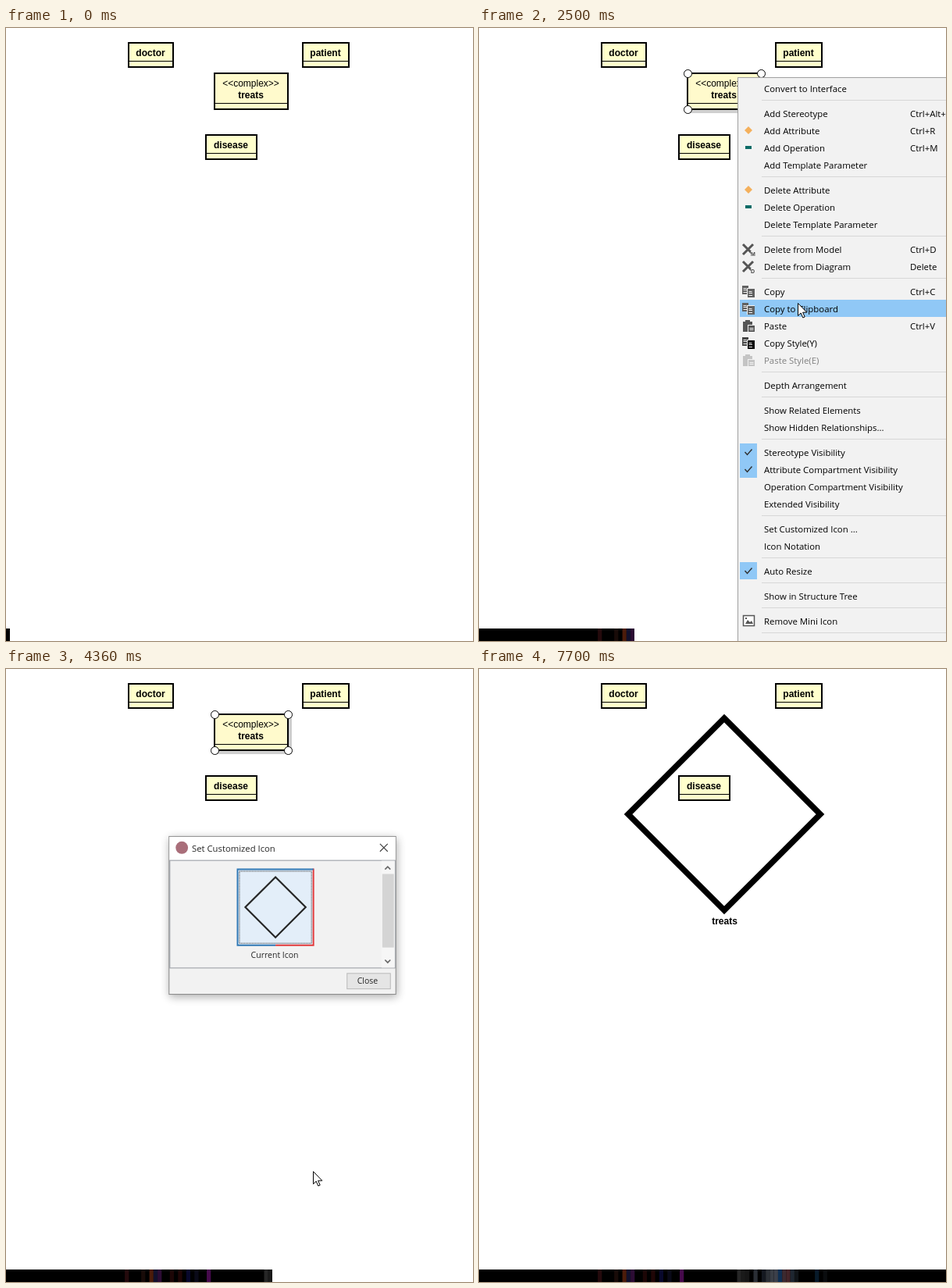
Write an HTML page that moves like this. It is 598 px wide and 785 px high and loops after 7.77 s.

```html
<!DOCTYPE html>
<html lang="en">
<head>
<meta charset="utf-8">
<title>Customized icon</title>
<style>
  html, body { margin: 0; width: 100%; height: 100%; overflow: hidden; background: #fff; }
  svg { display: block; }
  text { white-space: pre; }
  .uml { font: 12px "Liberation Sans", Arial, sans-serif; text-anchor: middle; }
  .bold { font-weight: bold; }
  .ui { font: 11.4px "Open Sans", "Noto Sans", sans-serif; }
  .small { font: 10.6px "Open Sans", "Noto Sans", sans-serif; text-anchor: middle; }
  #dialog { filter: drop-shadow(1px 3px 6px rgba(0, 0, 0, .38)); }
</style>
</head>
<body>
<svg id="stage" width="598" height="785" viewBox="0 0 598 785"></svg>
<script>
const LOOP = 7770, FRAMES = 114, SLOT = 598 / FRAMES;
const BLUE = '#90c8f6';

const rect = (x, y, w, h, fill, extra = '') =>
  `<rect x="${x}" y="${y}" width="${w}" height="${h}" fill="${fill}" ${extra}/>`;
const path = (d, stroke, width = 1, fill = 'none') =>
  `<path d="${d}" fill="${fill}" stroke="${stroke}" stroke-width="${width}"/>`;
const label = (x, y, text, cls, fill = '#000') =>
  `<text x="${x}" y="${y}" class="${cls}" fill="${fill}">${text}</text>`;
const group = (id, body) => `<g id="${id}">${body}</g>`;
const diamond = (x, y, r, stroke, width, fill) =>
  path(`M${x} ${y - r}l${r} ${r}l${-r} ${r}l${-r} ${-r}z`, stroke, width, fill);
const handles = (x1, y1, x2, y2) => [[x1, y1], [x2, y1], [x1, y2], [x2, y2]]
  .map(([x, y]) => `<circle cx="${x}" cy="${y}" r="5" fill="#fff" stroke="#000"/>`).join('');

function umlClass(name, x, y, w, h, stereotype) {
  const mid = x + w / 2, split = y + h - 9;
  return rect(x + 1, y + 1, w - 2, h - 2, '#ffffcc', 'stroke="#000" stroke-width="2"') +
    (stereotype ? rect(x + 2, y + 2, w - 4, h - 11, '#fffacc') +
      label(mid - .5, y + 18, stereotype, 'uml') : '') +
    rect(x + 2, split, w - 4, 1, '#000') +
    label(mid - .5, split - 6, name, 'uml bold');
}

// Menu icons, each drawn around the centre of its row.
const sheet = (x, y, c) => rect(x, y, 8, 11, c) +
  path(`M${x + 1.5} ${y + 3.5}h4M${x + 1.5} ${y + 5.5}h5M${x + 1.5} ${y + 8.5}h5`, '#f2f2f2');
const copyIcon = (back, front) => sheet(-8, -8, back) +
  rect(-2, -5, 10, 12, '#f2f2f2') + sheet(-1, -4, front) + rect(5, -4, 3, 11, front);
const pasteIcon = c => rect(-7, -6, 12, 13, c) + rect(-4, -8, 6, 3, c) +
  rect(-1, -2, 9, 10, '#f2f2f2') + rect(0, -1, 8, 8, c) +
  path('M1.5 2.5h5M1.5 4.5h5', '#f2f2f2');
const crossIcon = letter => path('M-7 -7L6 6M6 -7L-7 6', '#555', 3) +
  rect(3, 2, 6, 7, '#f2f2f2') +
  `<text x="3" y="8" font-size="7" font-weight="bold" font-family="Liberation Sans, sans-serif" fill="#444">${letter}</text>`;
const ICONS = {
  attr: diamond(0, -1, 5, 'none', 0, '#f4b05c'),
  oper: rect(-4, -3, 8, 4, '#0b6b66'),
  delM: crossIcon('M'),
  delD: crossIcon('D'),
  copy: copyIcon('#606060', '#606060'),
  style: copyIcon('#444', '#000'),
  paste: pasteIcon('#555'),
  pasteOff: pasteIcon('#c4c4c4'),
  check: path('M-4.5 -1l3 3.5l6 -7', '#303030', 1.4),
  image: rect(-6.5, -7.5, 14, 13, '#fff', 'stroke="#555" stroke-width="1.5"') +
    path('M-4 3l3 -5l3 3l2 -2l2 4z', 'none', 0, '#555') + rect(-4, -5, 2, 2, '#555')
};
const MENU = `Convert to Interface
-
Add Stereotype||Ctrl+Alt+S
Add Attribute|attr|Ctrl+R
Add Operation|oper|Ctrl+M
Add Template Parameter
-
Delete Attribute|attr
Delete Operation|oper
Delete Template Parameter
-
Delete from Model|delM|Ctrl+D
Delete from Diagram|delD|Delete
-
Copy|copy|Ctrl+C
Copy to Clipboard|copy
Paste|paste|Ctrl+V
Copy Style(Y)|style
Paste Style(E)|pasteOff
-
Depth Arrangement
-
Show Related Elements
Show Hidden Relationships...
-
Stereotype Visibility|check
Attribute Compartment Visibility|check
Operation Compartment Visibility
Extended Visibility
-
Set Customized Icon ...
Icon Notation
-
Auto Resize|check
-
Show in Structure Tree
-
Remove Mini Icon|image
-`.split('\n');

const rows = [];
function buildMenu() {
  let y = 78, lines = '', items = '', checks = '';
  for (const entry of MENU) {
    if (entry === '-') {
      lines += rect(362, y - 8, 236, 1, '#d7d7d7');
      y += 10;
      continue;
    }
    const [name, icon, keys] = entry.split('|');
    const ink = icon === 'pasteOff' ? '#808080' : '#000';
    rows.push({ y, checked: icon === 'check' });
    if (icon === 'check') checks += rect(334, y - 12, 22, 22, BLUE);
    if (icon) items += `<g transform="translate(345 ${y})">${ICONS[icon]}</g>`;
    items += label(365, y + 4, name, 'ui', ink);
    if (keys) items += label(552, y + 4, keys, 'ui', ink);
    y += 22;
  }
  return rect(331.5, 63.5, 300, 740, '#f2f2f2', 'stroke="#a0a0a0"') + lines + checks +
    rect(334, 0, 264, 22, BLUE, 'id="hover"') +
    rect(334, 0, 22, 22, '#58b0f5', 'id="hoverCheck"') + items;
}

function buildDialog() {
  return rect(207.5, 213.5, 293, 204, '#f0f0f0', 'stroke="#707070"') +
    rect(208, 214, 292, 30, '#fff') +
    '<circle cx="224" cy="228" r="8" fill="#9b5563"/>' +
    label(237, 233, 'Set Customized Icon', 'ui') +
    path('M480 223l10 10M490 223l-10 10', '#222', 1.2) +
    rect(208.5, 244.5, 291, 139, '#f0f0f0', 'stroke="#828790"') +
    rect(482, 245, 17, 138, '#f5f5f5') + rect(483, 262, 15, 95, '#cdcdcd') +
    path('M486.5 256l3.5 -3.5l3.5 3.5M486.5 373l3.5 3.5l3.5 -3.5', '#505050', 1.7) +
    rect(295, 255, 100, 100, '#dfecf9') +
    path('M394 255V354H345', '#e01818', 2) +
    path('M394 256H296V354H345', '#0f62a8', 2) +
    rect(298.5, 258.5, 93, 93, 'none', 'stroke="#000" stroke-dasharray="1 1"') +
    diamond(345, 305, 39, '#000', 2.2, 'none') +
    label(344, 371, 'Current Icon', 'small') +
    rect(437.5, 390.5, 56, 20, '#e1e1e1', 'stroke="#adadad"') +
    label(464, 404, 'Close', 'small');
}

// Dim tints inside the progress bar: slot number and colour.
const TINTS = {
  29: '#240a0c', 33: '#180b08', 35: '#4c1c0a', 36: '#12102c', 37: '#2c0c34', 40: '#1c0606',
  42: '#200606', 44: '#08082c', 46: '#0a0a18', 49: '#460a4c', 63: '#262626', 64: '#1a1a1a',
  65: '#161616', 67: '#2a2e34', 69: '#141820', 70: '#2c3036', 71: '#3a3e46', 72: '#3c404a',
  73: '#0e2e52', 74: '#3c2a30', 75: '#442428', 76: '#1e2630', 77: '#101418', 82: '#071a2a',
  84: '#0a0c0e'
};
const tints = Object.entries(TINTS)
  .map(([i, c]) => rect((i * SLOT).toFixed(1), 769, SLOT.toFixed(2), 16, c)).join('');

const stage = document.getElementById('stage');
stage.innerHTML =
  '<clipPath id="progress"><rect id="barClip" y="769" height="16"/></clipPath>' +
  rect(0, 0, 598, 785, '#fff') +
  umlClass('doctor', 156, 18, 59, 33) +
  umlClass('patient', 379, 18, 61, 33) +
  group('classView',
    group('classShadow', rect(270, 61, 96, 48, '#cfcfcf')) +
    umlClass('treats', 266, 57, 96, 48, '&lt;&lt;complex&gt;&gt;')) +
  group('iconView', diamond(314, 186, 123, '#000', 7.5, 'none') +
    label(314.5, 327, 'treats', 'uml bold')) +
  umlClass('disease', 255, 136, 67, 33) +
  group('labelHandles', handles(277.5, 62.5, 351.5, 77.5)) +
  group('classHandles', handles(267.5, 58.5, 361.5, 104.5)) +
  group('iconHandles', handles(187, 58.5, 441, 313.5)) +
  `<g clip-path="url(#progress)">${rect(0, 769, 598, 16, '#000')}${tints}</g>` +
  group('menu', buildMenu()) +
  group('dialog', buildDialog()) +
  '<circle id="click" fill="#f2f22e" fill-opacity=".62"/>' +
  group('cursor', path('M.5 .5V16.5L4.2 13L6.8 19L9.2 18L6.6 12.2H11.8Z', '#000', 1, '#fff'));

const el = {};
stage.querySelectorAll('[id]').forEach(node => el[node.id] = node);
const show = (node, on) => node.setAttribute('display', on ? 'inline' : 'none');
const set = (node, attrs) => {
  for (const key in attrs) node.setAttribute(key, attrs[key]);
};

// Start of every twelfth step, in ms; steps are even in between.
const MARKS = [70, 890, 1700, 2500, 3340, 4140, 4970, 5810, 6610, 7440];
function stepAt(time) {
  const t = time + 3;
  if (t < MARKS[0]) return 0;
  let i = MARKS.length - 1;
  while (t < MARKS[i]) i--;
  const last = i === MARKS.length - 1;
  const length = last ? (LOOP - MARKS[i]) / 5 : (MARKS[i + 1] - MARKS[i]) / 12;
  return Math.min(FRAMES - 1, 1 + i * 12 + Math.floor((t - MARKS[i]) / length));
}

// Pointer path: step, x, y.
const POINTER = [
  [3, 560, 790], [6, 535, 520], [9, 460, 260], [12, 375, 120], [16, 336, 67], [19, 331, 60],
  [30, 331, 60], [32, 345, 110], [34, 375, 200], [36, 404, 308], [37, 408, 352],
  [40, 404, 440], [45, 396, 557], [48, 395, 606], [53, 393, 643], [67, 393, 643],
  [72, 384, 500], [77, 358, 350], [80, 353, 322], [84, 353, 322], [89, 464, 400],
  [92, 464, 400], [95, 386, 386], [98, 386, 386], [102, 460, 530], [106, 574, 790]
];
function pointerAt(step) {
  const next = POINTER.findIndex(p => p[0] >= step);
  if (next < 1) return [0, 800];
  const [s0, x0, y0] = POINTER[next - 1], [s1, x1, y1] = POINTER[next];
  const k = (step - s0) / (s1 - s0);
  return [x0 + (x1 - x0) * k, y0 + (y1 - y0) * k];
}

const CLICKS = [[23, 331, 60], [57, 393, 643], [81, 353, 322], [90, 464, 400], [95, 386, 386]];
const RADII = [8, 12.5, 13, 9];
const DIALOG_ALPHA = { 62: .15, 63: .5, 64: .85, 92: .5 };

function draw(time) {
  const step = stepAt(time);
  const within = (from, to) => step >= from && step < to;
  const [x, y] = pointerAt(step);

  el.barClip.setAttribute('width', Math.round((step + 1) * SLOT));
  set(el.cursor, { transform: `translate(${Math.round(x)} ${Math.round(y)})` });

  show(el.classView, step < 83);
  show(el.iconView, step >= 83);
  show(el.labelHandles, within(20, 27));
  show(el.classShadow, within(27, 83));
  show(el.classHandles, within(27, 83));
  show(el.iconHandles, within(83, 96));

  const menuOpen = within(27, 61);
  const row = menuOpen && x > 333 && rows.find(r => y - 4 >= r.y - 12 && y - 4 < r.y + 10);
  show(el.menu, menuOpen);
  show(el.hover, row);
  show(el.hoverCheck, row && row.checked);
  if (row) {
    set(el.hover, { y: row.y - 12 });
    set(el.hoverCheck, { y: row.y - 12 });
  }

  const alpha = DIALOG_ALPHA[step] || 1;
  const scale = 1 - (1 - alpha) * .06;
  show(el.dialog, within(62, 93));
  set(el.dialog, {
    opacity: alpha,
    transform: `translate(354 315.5) scale(${scale}) translate(-354 -315.5)`
  });

  const click = CLICKS.find(([s]) => within(s, s + RADII.length));
  show(el.click, click);
  if (click) set(el.click, { cx: click[1], cy: click[2], r: RADII[step - click[0]] });
}

const start = performance.now();
function tick() {
  draw((performance.now() - start) % LOOP);
  requestAnimationFrame(tick);
}
tick();
</script>
</body>
</html>
```
